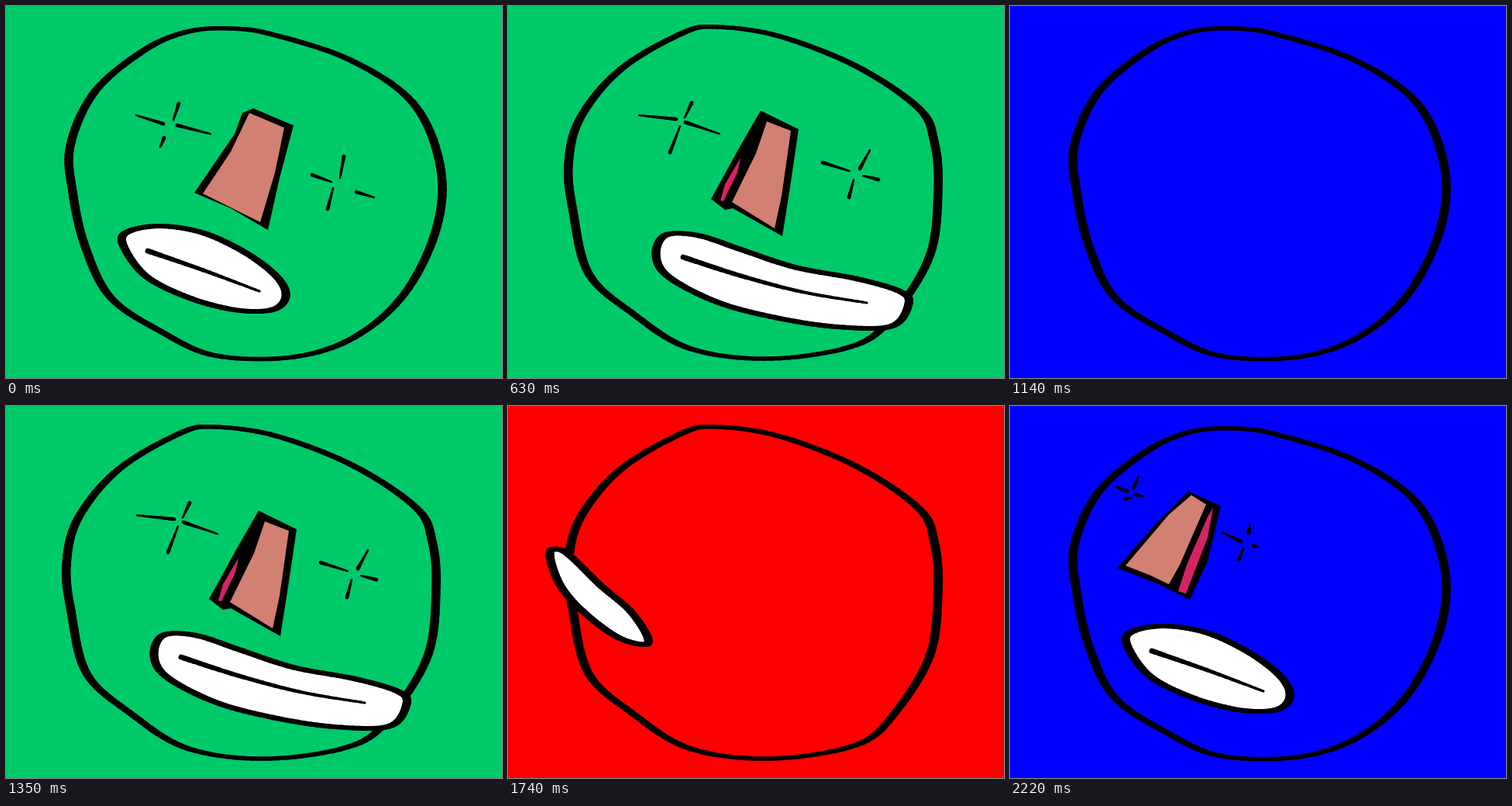
Recreate the animation shown at these times as an HTML page with a canvas. Size 640 by 480 pixels, loop 2.25 s.

```html
<!DOCTYPE html>
<html lang="en">
<head>
<meta charset="utf-8">
<title>Turning head</title>
<style>
html, body { margin: 0; width: 100%; height: 100%; overflow: hidden; background: #00c96a; }
canvas { display: block; width: 640px; height: 480px; }
</style>
</head>
<body>
<canvas id="stage" width="640" height="480"></canvas>
<script>
const ctx = document.getElementById('stage').getContext('2d');
const STEP = 30, STEPS = 75, HOLD = 3, POSES = 8;
const GROUNDS = ['#00c96a', '#ff0000', '#0000ff'];
const SKIN = '#d18072', SHADE = '#d32462';

// All shapes are flat x, y lists.
const roundHead = [290,29, 345,37, 445,70, 525,125, 560,205, 556,285, 515,370, 450,427, 370,453,
  270,451, 200,420, 135,376, 102,310, 86,240, 83,180, 115,110, 180,56, 235,33];
const squareHead = [270,27, 350,39, 450,78, 530,132, 550,175, 555,235, 545,320, 500,395, 450,437,
  340,455, 235,442, 160,396, 104,345, 84,265, 78,205, 93,145, 145,82, 225,35];

const mouthFront = {
  rim: [151,308, 158,291, 200,284, 255,293, 310,319, 350,350, 361,375, 343,392, 295,392, 235,376, 180,348],
  line: [183,316, 255,341, 327,368]
};
const mouthLeft = {
  rim: [56,228, 85,234, 130,264, 200,301, 280,334, 330,361, 349,385, 340,397, 300,390, 230,359,
    150,321, 85,274, 60,257],
  line: [62,246, 180,305, 284,367]
};
const mouthEdge = {
  rim: [54,192, 65,185, 82,195, 120,232, 160,267, 181,305, 145,300, 100,268, 68,232]
};
const mouthRight = {
  rim: [191,322, 203,296, 245,296, 300,314, 370,337, 450,352, 505,368, 517,384, 495,413, 425,414,
    345,402, 270,382, 208,350],
  line: [226,324, 300,348, 380,369, 463,383]
};

const noseFront = {
  rim: [243,241, 295,165, 305,138, 319,132, 371,154, 353,222, 338,289, 290,261],
  skin: [254,242, 290,188, 314,138, 359,157, 347,215, 328,279, 262,246]
};
const noseTurned = {
  rim: [138,209, 190,150, 230,110, 272,129, 255,200, 232,250, 190,229],
  skin: [149,206, 205,140, 234,115, 253,127, 219,205, 205,230, 180,218],
  shade: [262,131, 255,170, 227,242, 217,239, 228,205, 255,143]
};
const noseLeft = {
  rim: [43,162, 95,96, 134,54, 158,62, 120,155, 103,194, 65,177],
  skin: [52,163, 115,90, 143,64, 154,66, 57,167],
  shade: [57,167, 110,109, 145,67, 154,67, 120,142, 97,184]
};
const noseRight = {
  rim: [262,249, 300,180, 326,135, 375,159, 363,240, 354,297, 290,261, 280,263],
  skin: [289,253, 320,190, 334,149, 365,161, 353,245, 344,287],
  shade: [274,251, 280,230, 300,196, 296,215, 278,252]
};

// Eye spokes run from thick end to thin end, four values each.
noseFront.eyes = [203,152,168,141, 223,126,216,147, 221,154,264,165, 204,170,199,182,
  395,218,420,227, 436,194,431,222, 452,240,475,247, 415,262,422,235];
noseTurned.eyes = [151,110,136,104, 159,106,166,91, 162,114,172,117, 149,120,156,118,
  298,175,274,163, 308,164,310,153, 314,180,320,182, 295,199,301,184];
noseLeft.eyes = [162,100,151,116, 146,120,140,118, 147,128,152,127, 143,150,148,130];
noseRight.eyes = [217,146,169,141, 237,125,228,144, 229,150,273,165, 209,189,222,155,
  406,202,441,213, 454,210,467,186, 478,224,458,219, 440,247,446,224];

// Further poses reuse a drawing, placed by x scale, y scale, x shift, y shift.
const placed = (pose, sx, sy, dx, dy) => ({ ...pose, place: [sx, 0, 0, sy, dx, dy] });
const mouths = [
  mouthFront, placed(mouthLeft, 0.9, 0.85, 40, 55), mouthLeft, mouthEdge,
  null, placed(mouthEdge, -1, 1, 670, 60), placed(mouthLeft, -0.8, 0.6, 635, 160), mouthRight
];
const noses = [
  noseFront, noseTurned, noseLeft, null,
  null, null, placed(noseLeft, -1, 1, 615, 130), noseRight
];

function spline(a, b, c, d, u) {
  return b + u * (c - a + u * (2 * a - 5 * b + 4 * c - d + u * (3 * (b - c) + d - a))) / 2;
}

function pairs(list) {
  const pts = [];
  for (let i = 0; i < list.length; i += 2) pts.push([list[i], list[i + 1]]);
  return pts;
}

function smooth(list, closed) {
  const knots = pairs(list), count = knots.length, out = [];
  const at = i => knots[closed ? (i + count) % count : Math.max(0, Math.min(count - 1, i))];
  const ends = closed ? count : count - 1;
  for (let i = 0; i < ends; i++) {
    for (let s = 0; s < 10; s++) {
      out.push([0, 1].map(k => spline(at(i - 1)[k], at(i)[k], at(i + 1)[k], at(i + 2)[k], s / 10)));
    }
  }
  out.push(at(ends));
  return out;
}

function stroke(pts, width) {
  for (let i = 1; i < pts.length; i++) {
    const [x0, y0] = pts[i - 1], [x1, y1] = pts[i];
    const rise = Math.abs(y1 - y0) / (Math.hypot(x1 - x0, y1 - y0) || 1);
    ctx.lineWidth = width(i / pts.length, rise);
    ctx.beginPath();
    ctx.moveTo(x0, y0);
    ctx.lineTo(x1, y1);
    ctx.stroke();
  }
}

// A flat nib: upright parts come out thicker.
const nib = (thin, extra) => (u, rise) => thin + extra * rise ** 1.5;
const taper = (from, to) => u => from + (to - from) * u;

function fill(pts, color) {
  ctx.fillStyle = color;
  ctx.beginPath();
  pts.forEach(([x, y]) => ctx.lineTo(x, y));
  ctx.closePath();
  ctx.fill();
}

function drawEyes(list) {
  for (let i = 0; i < list.length; i += 4) {
    stroke(smooth(list.slice(i, i + 4), false), taper(5, 2));
  }
}

function drawNose({ rim, skin, shade, eyes }) {
  drawEyes(eyes);
  fill(pairs(rim), '#000');
  fill(pairs(skin), SKIN);
  if (shade) fill(pairs(shade), SHADE);
}

function drawMouth({ rim, line }) {
  const edge = smooth(rim, true);
  fill(edge, '#fff');
  stroke(edge, nib(6, 5));
  if (line) stroke(smooth(line, false), taper(7, 3));
}

function show(pose, paint) {
  if (!pose) return;
  ctx.save();
  if (pose.place) ctx.transform(...pose.place);
  paint(pose);
  ctx.restore();
}

function draw(n) {
  const beat = Math.floor(n / HOLD);
  const turn = Math.floor((n + 1) / HOLD);

  ctx.fillStyle = GROUNDS[n % 3];
  ctx.fillRect(0, 0, 640, 480);
  ctx.strokeStyle = '#000';
  ctx.lineCap = 'round';

  stroke(smooth(beat % 2 ? squareHead : roundHead, true), nib(5.5, 6));
  show(noses[turn % POSES], drawNose);
  show(mouths[beat % POSES], drawMouth);
}

const start = performance.now();
let last = -1;
function tick() {
  const n = Math.floor((performance.now() - start) / STEP) % STEPS;
  if (n !== last) draw(last = n);
  requestAnimationFrame(tick);
}
tick();
</script>
</body>
</html>
```
